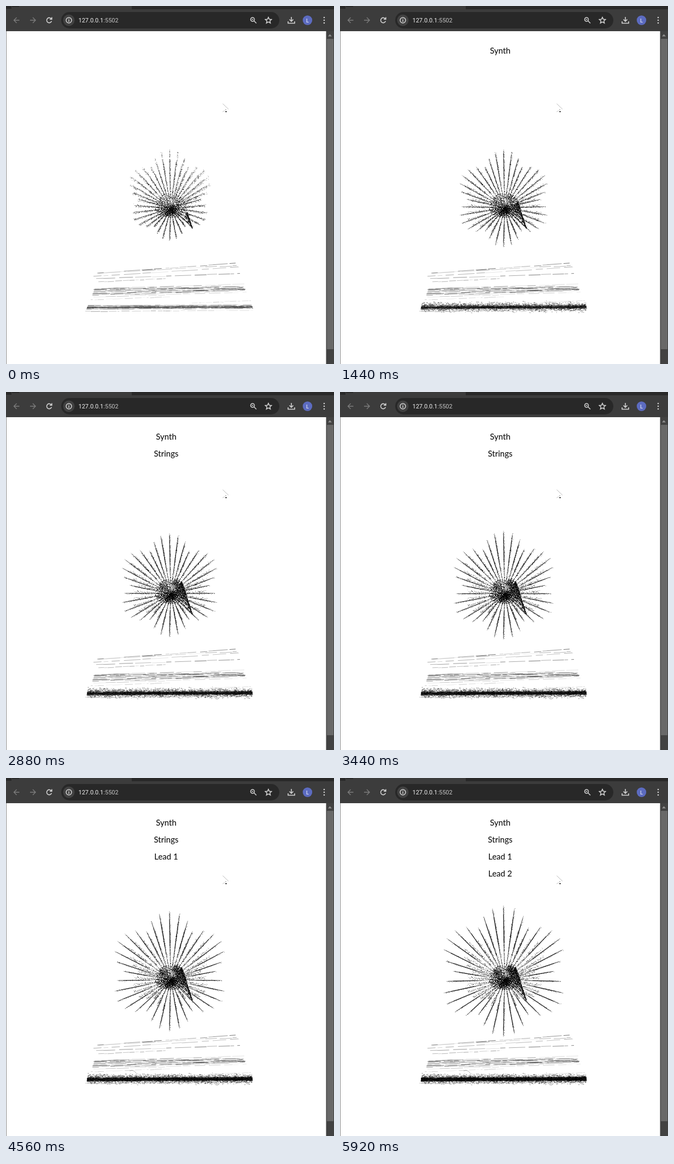
Recreate the animation shown at these times as an HTML page with a canvas. Size 600x654 px, loop 6000 ms.

```html
<!DOCTYPE html>
<html lang="en">
<head>
<meta charset="utf-8">
<title>Sketch</title>
<style>
html, body { margin: 0; width: 100%; height: 100%; overflow: hidden; background: #fff; }
canvas { display: block; }
</style>
</head>
<body>
<canvas id="stage" width="600" height="654"></canvas>
<script>
const c = document.getElementById('stage').getContext('2d');
const LOOP = 6000, STEP = 80, TAU = Math.PI * 2;
const labels = [['Synth', 400], ['Strings', 1680], ['Lead 1', 4240], ['Lead 2', 5520]];
const radius = [[0, 74], [800, 86], [2080, 90], [2880, 95], [4000, 104], [4560, 110], [5920, 120]];
const growth = [[0, 0], [800, .25], [2080, .55], [2880, .65], [4000, .8], [5920, 1]];

let seed;
function rnd() {
  seed = (seed * 1664525 + 1013904223) >>> 0;
  return seed / 4294967296;
}
const spread = () => rnd() + rnd() + rnd() - 1.5;
const ink = a => `rgba(0,0,0,${a})`;

function at(keys, t) {
  for (let i = 1; i < keys.length; i++) {
    const [t0, a] = keys[i - 1], [t1, b] = keys[i];
    if (t <= t1) return a + (b - a) * (t - t0) / (t1 - t0);
  }
  return keys[keys.length - 1][1];
}

function box(x, y, w, h, color) {
  c.fillStyle = color;
  c.fillRect(x, y, w, h);
}

function dot(x, y, alpha) {
  box(Math.round(x), Math.round(y), 1, 1, ink(alpha));
}

function disc(x, y, r, color) {
  c.fillStyle = color;
  c.beginPath();
  c.arc(x, y, r, 0, TAU);
  c.fill();
}

function path(d, color, w, x = 0, y = 0) {
  c.save();
  c.translate(x, y);
  c.strokeStyle = color;
  c.lineWidth = w;
  c.stroke(new Path2D(d));
  c.restore();
}

function line(x1, y1, x2, y2, color, w) {
  c.strokeStyle = color;
  c.lineWidth = w;
  c.beginPath();
  c.moveTo(x1, y1);
  c.lineTo(x2, y2);
  c.stroke();
}

function text(s, x, y, font, color, align) {
  c.font = font;
  c.fillStyle = color;
  c.textAlign = align;
  c.fillText(s, x, y);
}

function browser() {
  box(0, 0, 600, 46, '#3c3c3c');
  box(230, 0, 370, 6, '#292929');
  box(0, 0, 10, 5, '#292929');
  box(11, 0, 13, 1.5, '#242424');
  box(0, 46, 1, 608, '#8a8a8a');
  box(585.5, 46, 14.5, 608, '#424242');
  box(587, 60, 12, 567, '#686868');
  c.fillStyle = '#909090';
  c.fill(new Path2D('M589 55.5h7l-3.5-4z'));

  c.fillStyle = '#282828';
  c.beginPath();
  c.roundRect(101, 11, 399, 30, 15);
  c.fill();

  const pale = '#d2d2d2', dim = '#7c7c7c';
  path('M5 0H-5M0-5L-5 0L0 5', dim, 1.4, 19.5, 26);
  path('M-5 0H5M0-5L5 0L0 5', dim, 1.4, 49, 26);
  path('M4.2-2A4.6 4.6 0 1 0 4.4 1.6M4.8-5.5V-1.7H1', pale, 1.6, 79, 26);
  disc(115, 26, 10.5, '#414141');
  path('M5 0A5 5 0 1 1-5 0A5 5 0 1 1 5 0M0-.7V3M0-3V-1.7', pale, 1.5, 115, 26);
  const url = '11px Roboto, sans-serif';
  text('127.0.0.1', 132.5, 30, url, '#f0f0f0', 'left');
  const w = c.measureText('127.0.0.1').width;
  text(':5502', 132.5 + w, 30, url, '#c4c4c4', 'left');

  path('M2.5-1.5A3.5 3.5 0 1 1-4.5-1.5A3.5 3.5 0 1 1 2.5-1.5M1.5 1L6 5.5M-2.5-1.5H.5', pale, 1.5, 452, 26);
  path('M0-5.5L1.7-1.8L5.7-1.4L2.7 1.3L3.6 5.2L0 3.1L-3.6 5.2L-2.7 1.3L-5.7-1.4L-1.7-1.8Z', pale, 1.5, 480, 26);
  path('M0-6V2M-3.5-1.5L0 2L3.5-1.5M-6 2V5.5H6V2', pale, 1.6, 522, 26);
  disc(551.5, 26, 8.7, '#5c6bc0');
  text('L', 551.5, 29.5, '9.5px Roboto, sans-serif', '#fff', 'center');
  for (const y of [21, 26, 31]) disc(582, y, 1.3, pale);
}

function pointer() {
  line(396.5, 178.5, 407, 188.5, '#aaa', .8);
  line(396, 193.5, 400, 191, '#bbb', .8);
  box(401, 189, 2, 1, '#999');
  box(401, 192, 3, 2, '#555');
}

// A broken, slightly wavering pencil line
function streak(x1, y1, x2, y2, alpha, wobble = .6) {
  for (let u = 0; u < 1;) {
    const v = Math.min(1, u + .02 + rnd() * .1), j = spread() * wobble;
    line(x1 + (x2 - x1) * u, y1 + (y2 - y1) * u + j,
      x1 + (x2 - x1) * v, y1 + (y2 - y1) * v + j,
      ink(alpha * (.25 + rnd())), .75);
    u = v + rnd() * .03;
  }
}

function staves() {
  seed = 71;
  streak(167, 488, 420, 470, .6);
  streak(169, 488, 422, 474, .45);
  streak(160, 494, 426, 477, .45);
  streak(165, 498, 428, 489, .6);
  streak(169, 504, 292, 498, .4);
  streak(162, 517, 436, 508, .45);
  for (let i = 0; i < 11; i++) {
    const y = i / 10;
    streak(162 - y * 4, 516 + y * 13, 434 + y * 4, 512 + y * 8, .4, 1.8);
  }
  streak(160, 518, 435, 515, .6);
  streak(158, 526, 438, 517, .8);
  streak(160, 532, 440, 523, .25);
  streak(155, 537, 300, 531, .25);
  streak(340, 543, 448, 538, .25);
}

function waveform(p) {
  seed = 905;
  for (let i = 0; i < 12; i++) {
    const y = i / 11;
    streak(150 - y * 3, 547 + y * 7, 449 + y * 3, 546 + y * 6.5, .45, .5);
  }
  streak(145, 558, 300, 557, .5);
  streak(300, 557, 452, 556, .2);
  const h = 1.8 + p * 4.5;
  for (let x = 148; x < 451; x += 3) {
    const k = h * (.8 + rnd() * .4);
    box(x, 550.3 - (x - 300) * .004 - k / 2, 3, k, ink(.6 + p * .25));
  }
  for (let i = 0; i < 4600; i++) {
    const x = 148 + rnd() * 301, y = 549.5 + spread() * 7.5, w = 1 + rnd() * 1.5, a = .2 + rnd() * .4;
    if (i < 4600 * Math.sqrt(p)) box(x, y, w, .9, ink(a));
  }
  if (p > .5) path('M380 556Q386 567 392 556', ink(.4), .7);
  if (p > .75) path('M226 535Q235 532 239 541', ink(.4), .7);
}

function burst(R, p) {
  const cx = 299, cy = 353, hx = 301, hy = 369;
  seed = 33;
  for (let k = 0; k < 36; k++) {
    const a = k * TAU / 36, s = Math.sin(a), q = -Math.cos(a);
    const lobe = (93 + 28 * Math.abs(Math.cos(3 * a))) / 121;
    const tip = r => [cx + s * r * lobe, cy + q * r * lobe];

    // Soft first strokes, all running out of the heart
    const [fx, fy] = tip(75 + 16 * Math.max(0, -q));
    for (let i = 0; i < 120; i++) {
      const u = .14 + .86 * Math.pow(rnd(), .9), side = spread() * (.6 + 2.4 * u * Math.abs(s));
      dot(hx + (fx - hx) * u - q * side, hy + (fy - hy) * u + s * side, (.25 + rnd() * .5) * (1.2 - u * .6));
    }

    // Crisp rays that lengthen over them
    const [tx, ty] = tip(R);
    const mix = u => [hx + (tx - hx) * u, hy + (ty - hy) * u];
    line(...mix(.2), ...tip(R), ink(.25 + p * .2), .7);
    line(...mix(.38), ...mix(.97), ink(.2 + p * .4), 1);
    line(...mix(.5), ...mix(.88), ink(.1 + p * .4), 1.6);
    for (let i = 0; i < 30; i++) {
      const [x, y] = mix(.35 + rnd() * .65);
      dot(x + spread() * 1.5, y + spread() * 1.5, .4);
    }
  }

  // Dense heart
  for (let i = 0; i < 2000; i++) {
    const a = rnd() * TAU, r = 29 * Math.pow(rnd(), .85), al = .35 + rnd() * .45;
    if (i < 1300 + 700 * p) dot(hx + Math.cos(a) * r, hy + Math.sin(a) * r * (a < Math.PI ? .62 : .95), al);
  }
  for (let i = 0; i < 500; i++) dot(hx + spread() * 12, hy + 3 + spread() * 11, .7);

  // Tail between the heart and a straight right edge, filling away from its tip
  for (let i = 0; i < 1200; i++) {
    const u = Math.sqrt(rnd()), v = rnd() * rnd(), al = .35 + rnd() * .4;
    const x = 341 + (-20 - v * 20) * u, y = 406 + (-61 + v * 27) * u;
    if (u < .5 + p * .8) dot(x, y, al);
  }
  line(hx + 12, hy + 8, 341, 406, ink(.5), 1);
  line(332, 382, 341, 407, ink(.7), 1.6);

  for (let i = 0; i < 600; i++) {
    const right = i % 3, x = (right ? 312 : 288) + spread() * 8, y = (right ? 350 : 355) + spread() * 9;
    if (i < 600 * (p - .25) / .75) dot(x, y, .55);
  }
}

function draw(t) {
  const p = at(growth, t);
  box(0, 0, 600, 654, '#fff');
  browser();
  pointer();
  labels.forEach(([name, start], i) => {
    if (t >= start) text(name, 293, 87 + i * 31, '15px Lato, sans-serif', '#000', 'center');
  });
  staves();
  waveform(p);
  burst(at(radius, t), p);
}

const begin = performance.now();
let last = -1;
function tick() {
  const t = Math.floor((performance.now() - begin) % LOOP / STEP) * STEP;
  if (t !== last) draw(last = t);
  requestAnimationFrame(tick);
}
tick();
</script>
</body>
</html>
```
